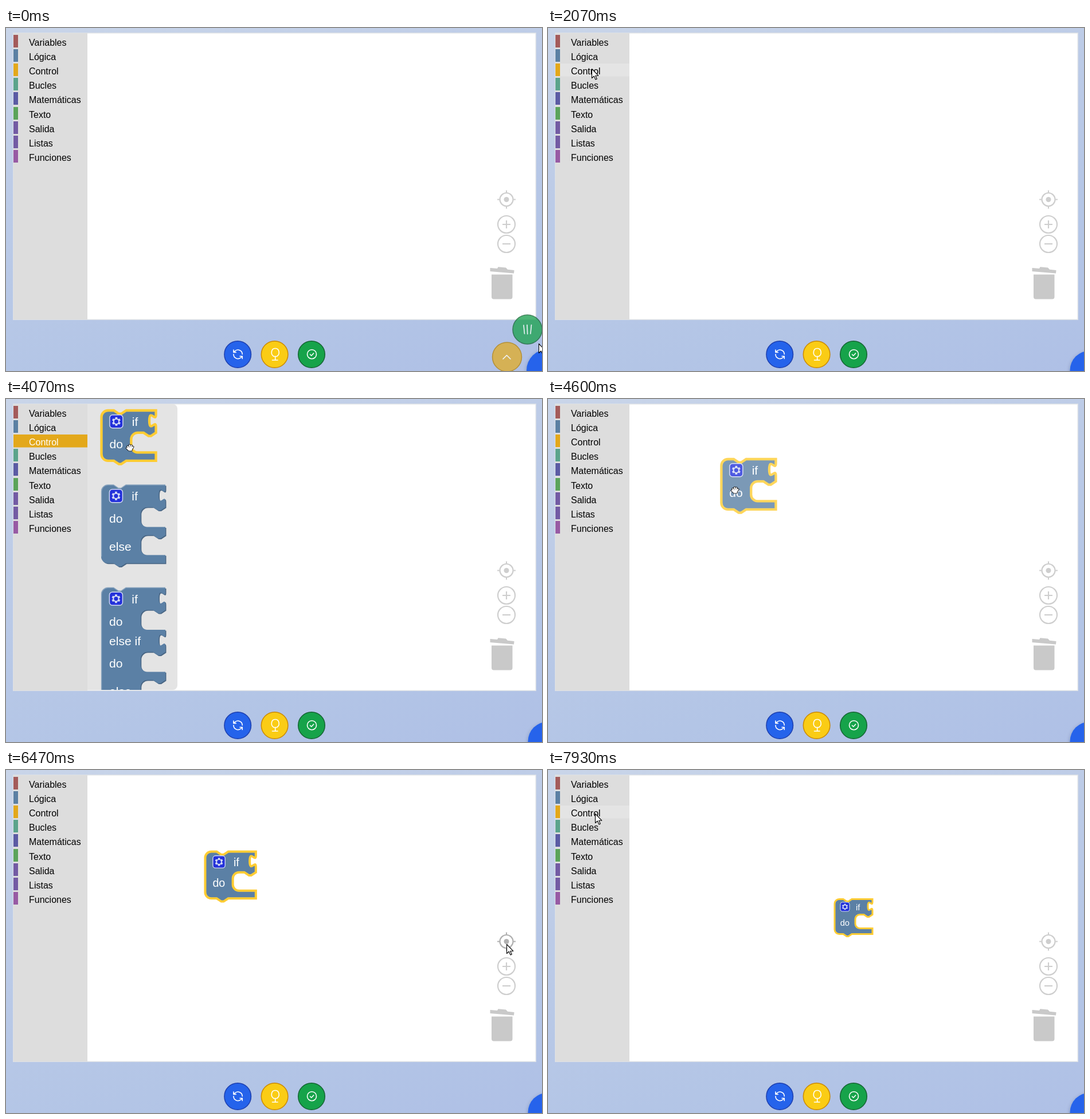
An HTML page for the animation above (8 s loop, 935 px wide and 599 px high).

```html
<!DOCTYPE html>
<html lang="es">
<head>
<meta charset="utf-8">
<title>Editor de bloques</title>
<style>
html, body { margin: 0; width: 100%; height: 100%; overflow: hidden; }
body { background: linear-gradient(165deg, #c9d5e9 0%, #bccbe7 35%, #b3c5e6 75%, #afc0e6 100%); }
svg { display: block; width: 100%; height: 100%; }
text { font: 16px "Liberation Sans", Arial, sans-serif; }
.block text { font-size: 14.67px; fill: #fff; }
.block .body { fill: #5b80a5; }
.block .shade { fill: #496684; }
.block .light { fill: none; stroke: #8ca6c0; }
.selected .body { stroke: #fc3; stroke-width: 3; }
.selected .light, .selected .shade { display: none; }
.line { fill: none; stroke: #fff; stroke-width: 1.6; stroke-linecap: round; stroke-linejoin: round; }
.tool { fill: none; stroke: #000; stroke-width: 2.2; opacity: .19; }
#arrow { fill: #fff; stroke: #000; stroke-width: 1.1; stroke-linejoin: round; }
#hand { stroke-linecap: round; stroke-linejoin: round; }
</style>
</head>
<body>
<svg viewBox="0 0 935 599" xmlns="http://www.w3.org/2000/svg">
  <defs>
    <path id="panel" d="M142 9H291a8 8 0 0 1 8 8V500a8 8 0 0 1-8 8H142z"/>
    <clipPath id="panelClip"><use href="#panel"/></clipPath>
    <filter id="soft" x="-30%" y="-30%" width="160%" height="160%">
      <feDropShadow dx="0" dy="2" stdDeviation="3" flood-color="#234" flood-opacity=".3"/>
    </filter>
    <path id="turn" d="M-9 0A9 9 0 0 1 6.400-6.400L9-4M9-9v5H4"/>
    <path id="fingers" d="M-2.500 5L-5.800 1M-3 2L-4-3M-.5 2V-6M2 2L3-5M4 2L6-2M-2.500 3.500H3.500M-1.500 6H3"/>
  </defs>

  <rect x="12" y="8" width="913" height="502" fill="#dde1e6"/>
  <rect x="142" y="9.500" width="781.500" height="499" fill="#fff"/>
  <rect x="13" y="9" width="129" height="500" fill="#ddd"/>
  <g id="rows"></g>

  <g class="tool" id="target" transform="translate(873 299.500)">
    <circle r="11.500"/>
    <path d="M0-16v5M0 11v5M-16 0h5M11 0h5"/>
    <circle r="4.500" fill="#000" stroke="none"/>
  </g>
  <g class="tool" transform="translate(873 343)"><circle r="15"/><path d="M-7 0h14M0-7v14"/></g>
  <g class="tool" transform="translate(873 377)"><circle r="15"/><path d="M-7 0h14"/></g>
  <g fill="#c9c9c9">
    <path d="M844.500 419l12.500 1l1.500-2.700l13.500 1.200l3 3.200l11.500 1.300l-.5 5.500l-41.500-3.500z"/>
    <path d="M847 430.500h36.500v39a4 4 0 0 1-4 4h-28.500a4 4 0 0 1-4-4z"/>
  </g>

  <g id="flyout">
    <use href="#panel" fill="#e4e4e4"/>
    <g id="shelf" clip-path="url(#panelClip)"></g>
  </g>
  <g id="desk"></g>

  <g id="buttons" stroke-width="1.500"></g>
  <g class="line" transform="translate(404.600 569.800) scale(-.85 .85)" style="stroke-width:1.900">
    <use href="#turn"/><use href="#turn" transform="rotate(180)"/>
  </g>
  <path class="line" d="M467 573.500C461 570 462.500 559.500 469.700 559.500S478.500 570 472.500 573.500zM469.700 574v5.500M464.500 580h9.500"/>
  <path class="line" d="M525.500 569.700a8 8 0 1 0 16 0a8 8 0 1 0-16 0M530.500 570l2.200 2.200l4-4.200"/>

  <g id="dial" stroke-width="1.500">
    <circle cx="909.500" cy="526.500" r="25.500" fill="#22a355" stroke="#166534"/>
    <path class="line" d="M903 519l1.500 15M909 518.500l.7 16M916.500 518.500l-1.500 15.500"/>
    <circle cx="874" cy="574.500" r="25.500" fill="#dfae32" stroke="#b4830c"/>
    <path class="line" d="M867 578l6.500-6.500l6.500 6.500"/>
  </g>
  <circle id="fab" cx="945" cy="598" fill="#2563eb" filter="url(#soft)"/>

  <g id="pointer">
    <path id="arrow" d="M.5.5v16l3.800-3.500l2.700 6l2.300-1l-2.500-5.800h5z"/>
    <g id="hand">
      <use href="#fingers" stroke="#000" stroke-width="4.600"/>
      <use href="#fingers" stroke="#fff" stroke-width="2.600"/>
    </g>
  </g>
</svg>

<script>
const $ = id => document.getElementById(id);
const SVG = "http://www.w3.org/2000/svg";
const LOOP = 8000, STEP = 200 / 3, ZOOM = 1.44;

function add(parent, tag, attrs = {}, text = "") {
  const el = document.createElementNS(SVG, tag);
  for (const key in attrs) el.setAttribute(key, attrs[key]);
  el.textContent = text;
  return parent.appendChild(el);
}

const hue = angle => `hsl(${angle} 29% 50%)`;
const categories = {
  Variables: hue(0), Lógica: hue(210), Control: "#e3a81b", Bucles: hue(160), Matemáticas: hue(240),
  Texto: hue(120), Salida: hue(260), Listas: hue(260), Funciones: hue(290)
};
const rows = Object.entries(categories).map(([name, color], i) => {
  const y = Math.floor(12.3 + i * 25.15);
  const back = add($("rows"), "rect", { x: 13, y, width: 129, height: 22.5 });
  add($("rows"), "rect", { x: 13, y, width: 8, height: 22, fill: color });
  const label = add($("rows"), "text", { x: 40, y: y + 19 }, name);
  return { name, y, back, label, color };
});

[["#2563eb", "#1e40af"], ["#facc15", "#ca8a04"], ["#16a34a", "#166534"]].forEach(([fill, stroke], i) =>
  add($("buttons"), "circle", { cx: 404.2 + i * 64.4, cy: 570, r: 23.3, fill, stroke }));

function addGear(parent) {
  const g = add(parent, "g", { transform: "translate(18 13.400)" });
  const blue = "#2331da", pale = "#d3daf5";
  add(g, "rect", { x: -8, y: -8, width: 16, height: 16, rx: 3.5, fill: blue, stroke: pale });
  for (const turn of [30, 90, 150])
    add(g, "path", { d: "M-5.200 0H5.200", stroke: pale, "stroke-width": 2.6, transform: `rotate(${turn})` });
  add(g, "circle", { r: 3.2, fill: blue, stroke: pale, "stroke-width": 1.4 });
}

// Each clause is [condition label or "", statement label].
function addBlock(parent, width, clauses) {
  const g = add(parent, "g", { class: "block" });
  const top = `A8 8 0 0 1 8 0H15l6 4h3l6-4H${width}`;
  const labels = [];
  let y = 0, d = "M0 8" + top;
  clauses.forEach(([condition, label], i) => {
    if (condition) {
      labels.push([i ? 9.7 : 37, y + 19, condition]);
      d += `V${y + 5}c0 10-8-8-8 7.500s8-2.500 8 7.500`;
    }
    y += condition ? 27 : 10;
    labels.push([9.7, y + 19, label]);
    d += `V${y}l-6 4h-3l-6-4h-7a8 8 0 0 0-8 8v8a8 8 0 0 0 8 8H${width}`;
    y += 24;
  });
  y += 10;
  d += `V${y}H30l-6 4h-3l-6-4H8a8 8 0 0 1-8-8z`;
  add(g, "path", { d, class: "shade", transform: "translate(1 1)" });
  add(g, "path", { d, class: "body" });
  add(g, "path", { d: `M.4 ${y - 8}V8` + top, class: "light" });
  addGear(g);
  for (const [x, base, text] of labels) add(g, "text", { x, y: base }, text);
  return g;
}

function place(el, x, y, scale) {
  el.setAttribute("transform", `translate(${x} ${y}) scale(${scale})`);
}

const plain = ["if", "do"], other = ["", "else"];
const first = addBlock($("shelf"), 66, [plain]);
place(first, 166.5, 20, ZOOM);
place(addBlock($("shelf"), 77.8, [plain, other]), 166, 150, ZOOM);
place(addBlock($("shelf"), 77.8, [plain, ["else if", "do"], other]), 166, 329.5, ZOOM);
const dropped = addBlock($("desk"), 66, [plain]);
dropped.classList.add("selected");

const OPEN = 2200, GRAB = 3800, DETACH = 4200, DROP = 4870, RESET = 6385;

// Pointer stops: time of arrival, x, y. Longer trips take longer.
const stops = [
  [0, 929, 551], [800, 83, 33], [1200, 91, 26], [2070, 76, 71], [2600, 206, 54],
  [2930, 185, 36], [3270, 256, 134], [GRAB, 190, 74], [4070, 216, 85], [4470, 340, 139],
  [4600, 326, 159], [5330, 88, 70], [6070, 916, 360], [6330, 873, 304], [7070, 41, 18],
  [7200, 112, 53], [7600, 78, 64], [7930, 82, 76], [LOOP, 82, 76]
];

const clamp = v => Math.min(1, Math.max(0, v));
const mix = (a, b, p) => a + (b - a) * p;
const smooth = p => p * p * (3 - 2 * p);

function pointerAt(t) {
  const i = Math.max(1, stops.findIndex(stop => stop[0] >= t));
  const [t0, x0, y0] = stops[i - 1], [t1, x1, y1] = stops[i];
  const trip = Math.min(t1 - t0, 200 + .4 * Math.hypot(x1 - x0, y1 - y0));
  const p = smooth(clamp(1 - (t1 - t) / trip));
  return [mix(x0, x1, p), mix(y0, y1, p)];
}

// The CSS "ease" curve.
function ease(x) {
  const curve = (s, a, b) => 3 * (1 - s) ** 2 * s * a + 3 * (1 - s) * s * s * b + s ** 3;
  let low = 0, high = 1;
  for (let i = 0; i < 20; i++) {
    const mid = (low + high) / 2;
    if (curve(mid, .25, .25) < x) low = mid; else high = mid;
  }
  return curve(low, .1, 1);
}

function show(el, on) { el.style.display = on ? "" : "none"; }

function draw(t) {
  const [x, y] = pointerAt(t);
  const open = t >= OPEN && t < DETACH;
  const held = t >= GRAB && t < DROP;
  const inside = (left, top) => x > left && x < left + 97 && y > top && y < top + 92;

  rows.forEach(row => {
    const chosen = open && row.name === "Control";
    const hover = x < 142 && y >= row.y && y < row.y + 23;
    row.back.setAttribute("fill", chosen ? row.color : hover ? "#e4e4e4" : "#ddd");
    row.label.setAttribute("fill", chosen ? "#fff" : "#000");
  });
  $("target").style.opacity = Math.hypot(x - 873, y - 299.5) < 16 ? .3 : "";

  show($("flyout"), open);
  first.classList.toggle("selected", t > OPEN + 300);

  show(dropped, t >= DETACH);
  dropped.style.opacity = t < DROP ? .8 : 1;
  if (t < DROP) {
    place(dropped, x - 23.6, y - 54, ZOOM);
  } else {
    const p = ease(clamp((t - RESET) / 500));
    place(dropped, mix(302.4, 500, p), mix(118, 225.5, p), mix(ZOOM, 1, p));
  }

  const overBlock = held || open && inside(165, 18) || t >= DROP && t < RESET && inside(302, 118);
  $("pointer").setAttribute("transform", `translate(${x} ${y})`);
  show($("arrow"), !overBlock);
  show($("hand"), overBlock);
  $("hand").setAttribute("transform", held ? "scale(.9 .75)" : "");

  const leave = clamp(t / 270);
  $("dial").style.opacity = .8 * (1 - leave);
  $("fab").setAttribute("r", mix(37, 34.5, leave));
}

const start = performance.now();
function tick() {
  const time = (performance.now() - start) % LOOP;
  draw(Math.round(Math.floor(time / STEP + .06) * STEP / 10) * 10 % LOOP);
  requestAnimationFrame(tick);
}
tick();
</script>
</body>
</html>
```
